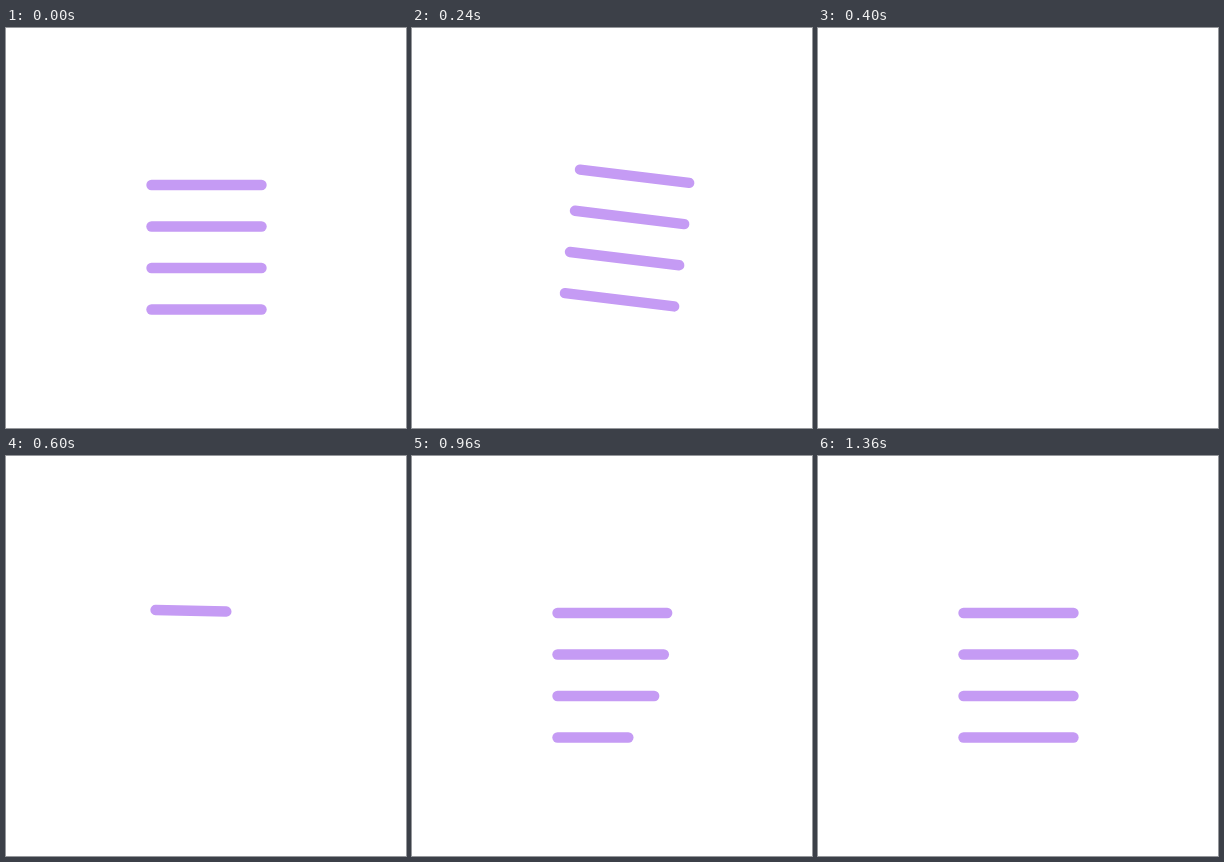
An HTML page that plays this animation: 400 by 400 pixels, repeating every 1.96 s.

```html
<!DOCTYPE html>
<html lang="en">
<head>
<meta charset="utf-8">
<title>Text lines</title>
<style>
  html, body { margin: 0; height: 100%; overflow: hidden; background: #fff; }
  svg { display: block; width: 100vw; height: 100vh; }
</style>
</head>
<body>
<svg viewBox="0 0 400 400">
  <g id="lines" stroke="#c59bf4" stroke-width="10.4" stroke-linecap="round"></g>
</svg>
<script>
const LOOP = 1960, STEP = 40, LEFT = 145.5, LENGTH = 110, STAGGER = 120;
const PIVOT = '284 335';
const group = document.getElementById('lines');
const lines = [157, 198.5, 240, 281.5].map(y => {
  const line = document.createElementNS('http://www.w3.org/2000/svg', 'line');
  line.setAttribute('x1', LEFT);
  line.setAttribute('y1', y);
  line.setAttribute('y2', y);
  return group.appendChild(line);
});

const progress = (t, start, end) => Math.min(1, Math.max(0, (t - start) / (end - start)));
const easeInOut = x => (1 - Math.cos(Math.PI * x)) / 2;
const curve = (a, b, u) => 3 * a * u * (1 - u) ** 2 + 3 * b * u * u * (1 - u) + u ** 3;

// Fast start, long tail: cubic-bezier(.131, .5, .136, 1)
function easeOut(x) {
  if (x <= 0 || x >= 1) return x;
  let low = 0, high = 1;
  for (let i = 0; i < 24; i++) {
    const mid = (low + high) / 2;
    if (curve(.131, .136, mid) < x) low = mid; else high = mid;
  }
  return curve(.5, 1, low);
}

// Swing after the first tilt: [time, degrees]
const swing = [[240, 6.93], [380, -1.4], [700, 2.05], [880, -.3], [960, 0]];

function tilt(t) {
  if (t < 240) return 7 * (1 - Math.exp(-Math.max(0, t - 32) / 45));
  const next = swing.findIndex(key => key[0] > t);
  if (next < 0) return 0;
  const [t0, a] = swing[next - 1], [t1, b] = swing[next];
  return a + (b - a) * easeInOut(progress(t, t0, t1));
}

function lineLength(t, index) {
  if (t < 400) return 1 - easeInOut(progress(t, 240, 400));
  const start = 497 + index * STAGGER;
  return easeOut(progress(t, start, start + 520));
}

function draw() {
  const t = Math.floor(performance.now() % LOOP / STEP) * STEP;
  group.setAttribute('transform', `rotate(${tilt(t)} ${PIVOT})`);
  lines.forEach((line, i) => {
    const size = lineLength(t, i);
    line.setAttribute('x2', LEFT + LENGTH * size);
    line.setAttribute('visibility', size > 0 ? 'visible' : 'hidden');
  });
  requestAnimationFrame(draw);
}
draw();
</script>
</body>
</html>
```
